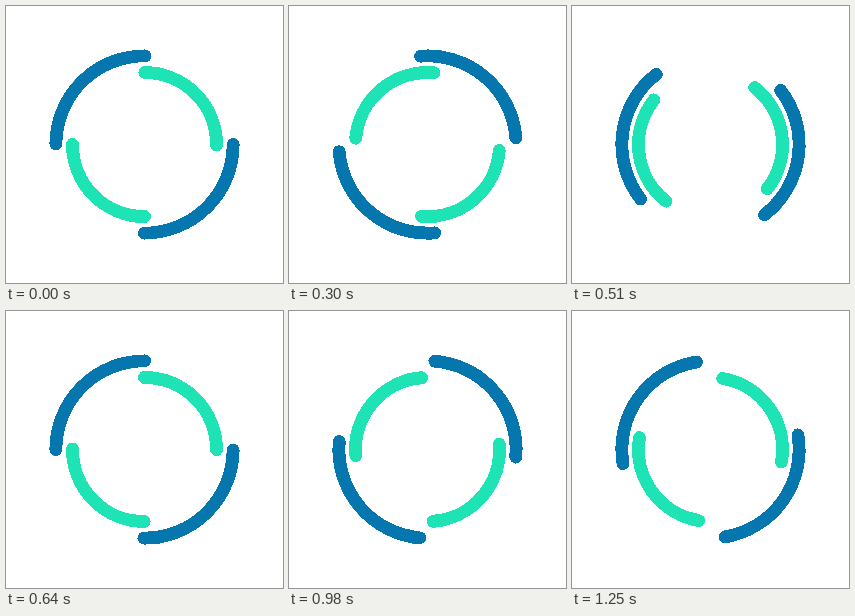
An HTML page for the animation above (1280 ms loop, 277 by 277 pixels).

```html
<!DOCTYPE html>
<html lang="en">
<head>
<meta charset="utf-8">
<title>Double ring spinner</title>
<style>
  html, body { margin: 0; width: 100%; height: 100%; overflow: hidden; background: #fff; }
  svg { display: block; width: 100vw; height: 100vh; }
  circle { fill: none; stroke-width: 5; stroke-linecap: round; }
</style>
</head>
<body>
<svg viewBox="0 0 100 100">
  <!-- Hard edges: keep only pixels the stroke covers completely -->
  <filter id="crisp" filterUnits="userSpaceOnUse" x="0" y="0" width="100" height="100"
          color-interpolation-filters="sRGB">
    <feComponentTransfer>
      <feFuncA type="linear" slope="40" intercept="-39"/>
    </feComponentTransfer>
  </filter>
  <g filter="url(#crisp)">
    <circle id="outer" cx="50" cy="50" r="32" stroke="#0577ae"/>
    <circle id="inner" cx="50" cy="50" r="26" stroke="#1ee3b5"/>
  </g>
</svg>
<script>
const LOOP = 1280, STEPS = 38, STEP_MS = 33.75;
const outer = document.getElementById('outer');
const inner = document.getElementById('inner');

// Two opposite quarter arcs per ring
for (const ring of [outer, inner]) {
  const quarter = ring.r.baseVal.value * Math.PI / 2;
  ring.setAttribute('stroke-dasharray', `${quarter} ${quarter}`);
}

// Step starts fall on whole hundredths of a second
const startOf = i => Math.round(i * STEP_MS / 10) * 10;

function stepAt(t) {
  let i = STEPS - 1;
  while (i > 0 && startOf(i) > t) i--;
  return i;
}

const turn = (ring, deg) => ring.setAttribute('transform', `rotate(${deg} 50 50)`);

function draw(ms) {
  const angle = stepAt(ms % LOOP) * 360 / STEPS;
  turn(outer, angle);
  turn(inner, 90 - angle);
}

let start;
function tick(now) {
  start ??= now;
  draw(Math.max(0, now - start));
  requestAnimationFrame(tick);
}
draw(0);
requestAnimationFrame(tick);
</script>
</body>
</html>
```
